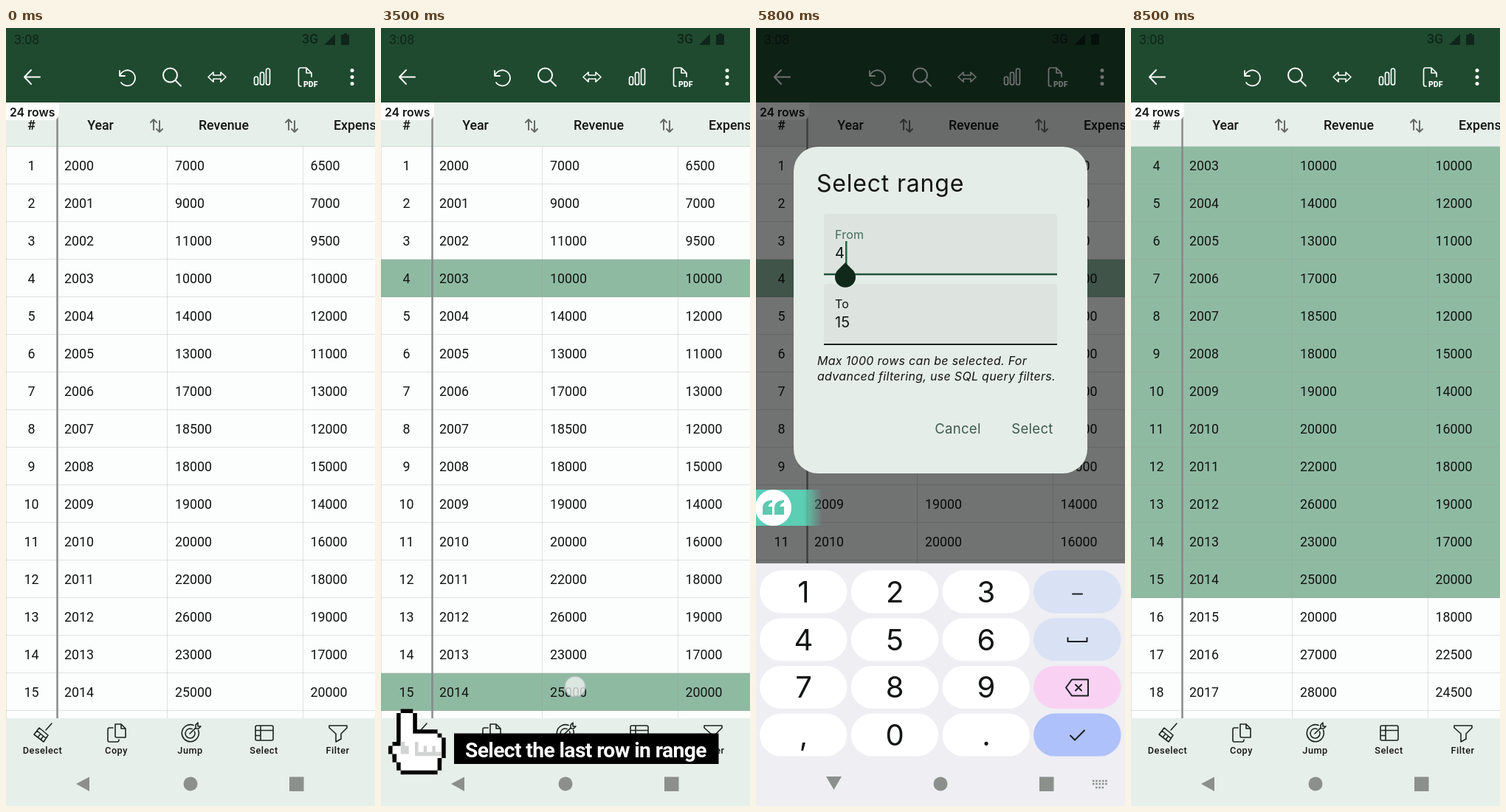
Recreate the animation shown at these times as an HTML page. Size 500 px wide and 1055 px high, loop 8.6 s.

```html
<!DOCTYPE html>
<html lang="en">
<head>
<meta charset="utf-8">
<title>Select a range of rows</title>
<style>
html, body { margin: 0; width: 100%; height: 100%; overflow: hidden; background: #e7efea; }
#stage { position: absolute; left: 0; top: 0; width: 500px; height: 1055px; overflow: hidden; }
svg { position: absolute; left: 0; top: 0; }
text { font: 17.8px Roboto, sans-serif; fill: #121513; }
.mid { text-anchor: middle; }
.head text { font-weight: 500; }
.line { fill: none; stroke-width: 2; stroke-linecap: round; stroke-linejoin: round; }
.white { stroke: #fbfdfb; }
.ink { stroke: #1d2420; stroke-width: 1.6; }
.bar { fill: #e7efea; }
.tools text { font-size: 12.7px; font-weight: 500; letter-spacing: .5px; }
.soft { fill: #8b908d; }
.cell { stroke: #8f9d95; stroke-opacity: .28; }
.tip text { font-size: 28.2px; font-weight: 700; letter-spacing: -.6px; fill: #fff; }
#dialog text { font-family: Inter, sans-serif; font-size: 16px; letter-spacing: .2px; }
#dialog .title { font-size: 32px; letter-spacing: .8px; }
#dialog .value { font-size: 20px; }
#dialog .hint { font-style: italic; letter-spacing: .3px; }
#dialog .button { font-size: 18.5px; letter-spacing: .3px; fill: #3d5a4a; }
#keyboard text { font: 40px Inter, sans-serif; }
.touch { fill: #f4f5f4; fill-opacity: .75; stroke: #a3b2b4; stroke-opacity: .6; stroke-width: 2; }
#banner { position: absolute; left: 0; top: 626px; width: 500px; height: 49px; }
#strip {
  position: absolute; inset: 0; overflow: hidden; white-space: nowrap;
  background: linear-gradient(90deg, #5bcfb8, #5ac9a4 50%, #74cfa8);
  font: 900 41px/47px Lato, sans-serif; letter-spacing: .6px; color: #fff; text-indent: 71px;
  -webkit-mask: linear-gradient(90deg, #000 50%, transparent 52.5%) no-repeat 0 0 / 1000px 100%;
  mask: linear-gradient(90deg, #000 50%, transparent 52.5%) no-repeat 0 0 / 1000px 100%;
}
</style>
</head>
<body>
<div id="stage">
<svg width="500" height="1055" viewBox="0 0 500 1055">
  <defs>
    <clipPath id="view"><rect y="161" width="500" height="775"/></clipPath>
    <path id="palm" d="M3 1H6V6H12V7H13V12H12V15H3V13H2V11H1V9H3Z"/>
    <g id="hand">
      <use href="#palm" x="1"/><use href="#palm" x="-1"/><use href="#palm" y="1"/><use href="#palm" y="-1"/>
      <use href="#palm" fill="#fff"/>
      <path fill="#d2d4d3" d="M3 8H4V9H5V11H3Z M6.5 8H7.3V10.5H8.6V9H9.4V10.5H10.7V9H11.5V10.5H13V11.5H6.5Z"/>
    </g>
    <g id="sort" class="line" stroke="#666b68" stroke-width="1.6">
      <path d="M-4 6V-8M-8 -4L-4 -8L0 -4M4 -6V9M0 5L4 9L8 5"/>
    </g>
  </defs>

  <rect width="500" height="1055" fill="#fcfdfd"/>
  <g clip-path="url(#view)"><g id="rows"></g></g>
  <path class="cell" d="M.5 161V936M218.5 161V936M402.5 161V936"/>

  <g class="head">
    <rect class="bar" y="101" width="500" height="60"/>
    <path class="cell" d="M0 160.5H500"/>
    <text class="mid" x="34.5" y="138">#</text>
    <text class="mid" x="128" y="138">Year</text>
    <text class="mid" x="295" y="138">Revenue</text>
    <text x="444" y="138">Expenses</text>
    <use href="#sort" x="204" y="132"/><use href="#sort" x="387" y="132"/>
  </g>
  <rect x="68.3" y="101" width="2.4" height="835" fill="#838886"/>
  <path d="M0 101H72V115Q72 125 62 125H0Z" fill="#fcfdfd"/>
  <text x="5" y="120" style="font:600 15.8px Inter,sans-serif">24 rows</text>

  <rect width="500" height="101" fill="#1f4a2f"/>
  <g fill="#10261a">
    <text x="11" y="22" style="fill:#10261a">3:08</text>
    <text x="401" y="21" style="fill:#10261a;font-weight:500">3G</text>
    <path d="M446 8V23H431ZM456 9H458V7H462V9H465V23H454V9Z"/>
  </g>
  <g class="line white">
    <path d="M46 66.5H25M34 57L25 66.5L34 76"/>
    <path d="M154 58V65H161M154.5 64.5A10.5 10.5 0 1 1 156 74" stroke-width="1.8"/>
    <circle cx="222.5" cy="64" r="9.5"/><path d="M229.5 71L237 78.5"/>
    <path d="M274 66.5L281 60V64H291V60L298 66.5L291 73V69H281V73Z" stroke-width="1.7"/>
    <g stroke-width="1.7">
      <rect x="336.5" y="66" width="5" height="11" rx="2.5"/>
      <rect x="344.5" y="60" width="5" height="17" rx="2.5"/>
      <rect x="352.5" y="55" width="5" height="22" rx="2.5"/>
      <path d="M400 79H399Q396.5 79 396.5 76V57Q396.5 54 399 54H407L414 61V66M407 54V61H414"/>
    </g>
  </g>
  <text x="403" y="80" style="font-size:10.5px;font-weight:900;fill:#fbfdfb">PDF</text>
  <g fill="#fbfdfb"><circle cx="469" cy="57.5" r="2.5"/><circle cx="469" cy="66.5" r="2.5"/><circle cx="469" cy="75.5" r="2.5"/></g>

  <rect class="bar" y="936" width="500" height="119"/>
  <g class="tools">
    <g class="line ink">
      <path d="M62 943L54 952M45 949L57 959L51 968L38 958ZM42 953L54 963M43 962L47 957M47 965L50 961"/>
      <path d="M148 944H156L162 950V962H150Q148 962 148 960ZM156 944V950H162M145 949H140Q138 949 138 951V966Q138 968 140 968H151Q153 968 153 965"/>
      <path d="M254 945.5A11.5 11.5 0 1 0 260.5 952M252 950.5A6.5 6.5 0 1 0 255.5 954M249 957L257 949V945L260 942V947H264L261 950H257"/>
      <path d="M340 946H360Q362 946 362 948V964Q362 966 360 966H340Q338 966 338 964V948Q338 946 340 946ZM345 946V966M338 952.5H362M338 959.5H345"/>
      <path d="M438 946H462V949L454 957V964L447 968V957L438 949Z"/>
    </g>
    <g class="mid" id="labels"></g>
  </g>
  <g class="soft">
    <path d="M113 1015.5V1035L95 1025Z"/><circle cx="250" cy="1025" r="9.5"/><rect x="384" y="1015.5" width="19.5" height="19.5"/>
  </g>

  <g class="tip" id="tip1">
    <use href="#hand" transform="translate(10 364) scale(5.55)"/>
    <rect x="99" y="397" width="363" height="41.5"/><text x="114" y="429.5">Select the first row in range</text>
  </g>
  <g class="tip" id="tip2">
    <use href="#hand" transform="translate(10 923.5) scale(5.55)"/>
    <rect x="99" y="956.5" width="358.5" height="41.5"/><text x="114" y="989">Select the last row in range</text>
  </g>

  <rect id="scrim" width="500" height="994"/>

  <g id="dialog">
    <rect x="51" width="398" height="443" rx="33" fill="#e5ede8"/>
    <text class="title" x="82" y="61">Select range</text>
    <path d="M92 173V95Q92 91 96 91H404Q408 91 408 95V173ZM92 268V190Q92 186 96 186H404Q408 186 408 190V268Z" fill="#dde4e0"/>
    <path d="M92 173H408" stroke="#25503a" stroke-width="2.5"/>
    <path d="M92 268H408" stroke="#1a211d" stroke-width="1.8"/>
    <text x="107" y="124.5" style="fill:#3f6c55">From</text><text class="value" x="107" y="150.5">4</text>
    <text x="107" y="218.5">To</text><text class="value" x="107" y="244.5">15</text>
    <rect id="caret" x="121" y="128" width="2.5" height="32" fill="#2c6346"/>
    <path id="grip" d="M121 157L131 167A14 14 0 1 1 111 167Z" fill="#10291b"/>
    <text class="hint" x="83" y="296">Max 1000 rows can be selected. For</text>
    <text class="hint" x="83" y="316.5">advanced filtering, use SQL query filters.</text>
    <rect id="press" x="332" y="357.5" width="86" height="50" rx="25" fill="#d0d8d4"/>
    <text class="button mid" x="273.5" y="388.5">Cancel</text><text class="button mid" x="374.5" y="388.5">Select</text>
  </g>

  <g id="keyboard">
    <rect y="726" width="500" height="329" fill="#eeeef3"/>
    <g id="keys"></g>
    <g class="line" stroke="#1c1e22" stroke-width="2.6">
      <path d="M429 767.5H442M422.5 827V832H448.5V827"/>
      <path d="M428 883.5H450V905.5H428L420 894.5ZM433 890.5L441 898.5M441 890.5L433 898.5"/>
      <path d="M426 959.5L432 965.5L445 952.5"/>
    </g>
    <g class="soft">
      <path d="M95 1015H116L105.5 1033Z"/><circle cx="250" cy="1025" r="9.5"/><rect x="384" y="1015.5" width="19.5" height="19.5"/>
      <path d="M456 1021H476M456 1025H476M460 1030H472" stroke="#8b908d" stroke-width="2.5" stroke-dasharray="2.5 1.8"/>
    </g>
  </g>

  <circle class="touch" id="tap1" cx="263" cy="340" r="14"/>
  <circle class="touch" id="tap2" cx="263" cy="893" r="14"/>
  <circle class="touch" id="tap3" cx="356" cy="962" r="14"/>
  <circle class="touch" id="tap4" cx="383" cy="543.5" r="14"/>
</svg>
<div id="banner">
  <div id="strip">from/to auto selected</div>
  <svg width="50" height="49">
    <circle cx="23.5" cy="24.5" r="24.5" fill="#fff"/>
    <path d="M22 14V17Q17 19 16.5 23H22V34H9V25Q9 15 22 14ZM38 14V17Q33 19 32.5 23H38V34H25V25Q25 15 38 14Z" fill="#5ccab0"/>
  </svg>
</div>
</div>
<script>
const LOOP = 8600;
const $ = id => document.getElementById(id);

// Table values in hundreds
const revenue = [70, 90, 110, 100, 140, 130, 170, 185, 180, 190, 200, 220, 260, 230, 250, 200, 270, 280, 290];
const expense = [65, 70, 95, 100, 120, 110, 130, 120, 150, 140, 160, 180, 190, 170, 200, 180, 225, 245, 250];

$('rows').innerHTML = revenue.map((r, i) => {
  const y = 161 + 51 * i, base = y + 31.5;
  return `<rect id="row${i + 1}" y="${y}" width="500" height="51" fill="#8fbaa2"/>
    <path class="cell" d="M0 ${y + 50.5}H500"/>
    <text class="mid" x="34.5" y="${base}">${i + 1}</text>
    <text x="79" y="${base}">${2000 + i}</text>
    <text x="229" y="${base}">${r * 100}</text>
    <text x="412.5" y="${base}">${expense[i] * 100}</text>`;
}).join('');

$('labels').innerHTML = ['Deselect', 'Copy', 'Jump', 'Select', 'Filter']
  .map((s, i) => `<text x="${49.5 + 100 * i}" y="983.5">${s}</text>`).join('');

const sideFill = ['#d9e1f5', '#d9e1f5', '#f9d2f3', '#aec1fb'];
$('keys').innerHTML = ['123', '456', '789', ',0.'].map((line, r) =>
  [...line, ''].map((c, k) => `<rect x="${5 + 123.7 * k}" y="${735.5 + 64.7 * r}" width="118.5" height="58" rx="29"
      fill="${k < 3 ? '#fff' : sideFill[r]}"/>
    <text class="mid" x="${64.5 + 123.7 * k}" y="${779 + 64.7 * r}">${c}</text>`).join('')).join('');

// Each step [ms, value] holds until the next one
function play(id, prop, ...steps) {
  steps.push([LOOP, steps[steps.length - 1][1]]);
  const frames = steps.map(([ms, v]) => ({ offset: ms / LOOP, [prop]: v, easing: 'step-end' }));
  $(id).animate(frames, { duration: LOOP, iterations: Infinity });
}
const show = (id, from, to = LOOP) =>
  play(id, 'visibility', [0, 'hidden'], [from, 'visible'], ...(to < LOOP ? [[to, 'hidden']] : []));
const slide = (id, ...steps) =>
  play(id, 'transform', ...steps.map(([ms, y]) => [ms, `translate(0px, ${y}px)`]));
const maskProp = 'maskPosition' in document.body.style ? 'maskPosition' : 'webkitMaskPosition';
const reveal = (id, ...steps) =>
  play(id, maskProp, ...steps.map(([ms, w]) => [ms, `${w - 500}px 0px`]));

revenue.forEach((_, i) => {
  const n = i + 1, inside = n >= 4 && n <= 15;
  show(`row${n}`, n === 4 ? 2000 : n === 15 ? 3400 : inside ? 7600 : LOOP);
});
slide('rows', [0, 0], [7600, -153]);

show('tip1', 500, 2200);
show('tip2', 2600, 4300);
show('tap1', 1900, 2100);
show('tap2', 3400, 3600);
show('tap3', 5200, 5500);
show('tap4', 7200, 7500);
show('press', 7200, 7500);

play('scrim', 'opacity', [0, 0], [5400, .17], [5500, .55], [7500, .17], [7600, 0]);
play('dialog', 'opacity', [0, 0], [5400, .4], [5500, 1], [7500, .5], [7600, 0]);
slide('dialog', [0, 291], [5600, 230], [5700, 180], [5800, 161], [5900, 156]);
slide('keyboard', [0, 340], [5600, 180], [5700, 50], [5800, 0], [7600, 150], [7700, 340]);
play('caret', 'opacity', [0, 1], [5900, 0], [6400, 1], [6900, 0]);
play('grip', 'opacity', [0, 0], [5700, 1]);

show('banner', 5700, 8000);
play('strip', 'color', [0, 'transparent'], [5900, '#fff']);
reveal('strip', [0, -30], [5800, 65], [5900, 160], [6000, 270], [6100, 370], [6200, 450], [6300, 500],
  [7700, 370], [7800, 160], [7900, -30]);
</script>
</body>
</html>
```
